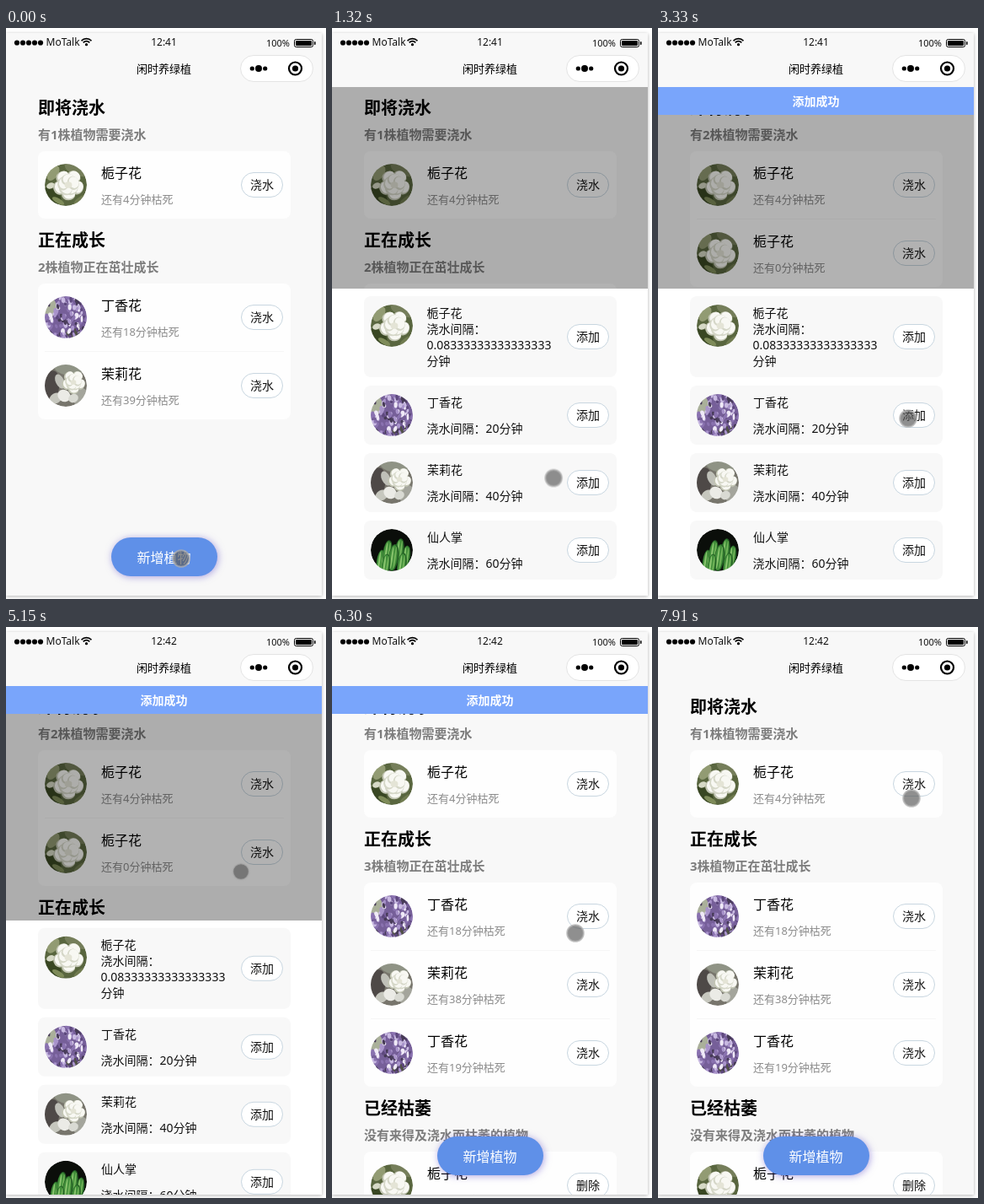
Recreate the animation shown at these times as an HTML page. Size 380 by 677 pixels, loop 7990 ms.

```html
<!DOCTYPE html>
<html lang="zh-CN">
<head>
<meta charset="utf-8">
<title>浇水提醒</title>
<style>
  html, body { margin: 0; width: 100%; height: 100%; overflow: hidden; background: #fff; }
  #stage { display: block; width: 380px; height: 677px; }
  text { font-family: "Noto Sans", "Noto Sans CJK SC", "Noto Sans CJK", sans-serif; }
  .phone { fill: #f8f8f8; filter: drop-shadow(0 1px 2px rgba(0, 0, 0, .3)); }
  .fab { fill: #5f90e8; filter: drop-shadow(1px 1px 4px rgba(95, 75, 200, .5)); }
  .pill { fill: #fff; stroke: #c8d6e0; }
  .soft { filter: blur(.7px); }
</style>
</head>
<body>
<svg id="stage" viewBox="0 0 380 677"></svg>
<script>
const LOOP = 7990;
const css = [];

// Registers a looping animation on #id from a map of { ms: declarations }.
function animate(id, timing, frames) {
  const steps = Object.entries(frames).map(([ms, rule]) => `${(ms / LOOP * 100).toFixed(3)}% { ${rule} }`);
  css.push(`@keyframes ${id} { ${steps.join(' ')} }`, `#${id} { animation: ${id} ${LOOP}ms ${timing} infinite; }`);
}
const show = (id, from, to) => animate(id, 'step-end', {
  0: 'visibility: hidden', [from]: 'visibility: visible', [to]: 'visibility: hidden'
});

const text = (x, y, size, str, { fill = '#111', weight = 400, anchor = 'start' } = {}) =>
  `<text x="${x}" y="${y}" font-size="${size}" fill="${fill}" font-weight="${weight}" text-anchor="${anchor}">${str}</text>`;
const rect = (x, y, w, h, r, fill) => `<rect x="${x}" y="${y}" width="${w}" height="${h}" rx="${r}" fill="${fill}"/>`;
const dot = (x, y, r, fill = '#000') => `<circle cx="${x}" cy="${y}" r="${r}" fill="${fill}"/>`;
const oval = (x, y, rx, ry, fill, turn = 0) =>
  `<ellipse rx="${rx}" ry="${ry}" fill="${fill}" transform="translate(${x} ${y}) rotate(${turn})"/>`;
const repeat = (n, draw) => Array.from({ length: n }, (_, i) => draw(i)).join('');

function randomizer(seed) {
  return () => (seed = (seed * 16807) % 2147483647) / 2147483647;
}

// Three rings of petals, each on its own shadow.
function rose(x, y, size) {
  const ring = (r, turn, shade) => repeat(5, i => {
    const a = i * Math.PI * .4 + turn;
    const px = x + Math.cos(a) * r, py = y + Math.sin(a) * r, deg = a * 180 / Math.PI;
    return oval(px, py, size * .4, size * .48, shade, deg) + oval(px + .8, py - .8, size * .34, size * .41, '#f8f8f3', deg);
  });
  return ring(size * .68, .3, '#c3c6b4') + ring(size * .36, .9, '#d5d7c8') + oval(x, y, size * .26, size * .22, '#e4e4d6');
}

function lilac() {
  const rnd = randomizer(77);
  const tones = ['#5d487d', '#8a72b0', '#c9bae2', '#efe9f7', '#463a56', '#a994cb'];
  return dot(0, 0, 25, '#765f99') + oval(-20, -12, 9, 12, '#aab09a') + oval(14, 20, 14, 7, '#4f5044') +
    repeat(130, i => oval(rnd() * 50 - 25, rnd() * 50 - 25, 1.3 + rnd() * 1.2, 1.8 + rnd() * 2.2, tones[i % 6], rnd() * 60 - 30));
}

function cactus() {
  const stems = [[-13, 13, 5], [17, 8, 5], [-5, 3, 5.5], [9, 1, 5.5], [2, 9, 6], [-7, 18, 5], [12, 18, 5.5]];
  return dot(0, 0, 25, '#0b0e0a') + stems.map(([x, y, w]) =>
    oval(x, y, w, w * 2.7, '#245f25', 8) + oval(x - .5, y, w * .8, w * 2.5, '#43903b', 8) +
    oval(x - 1.8, y, 1, w * 2.2, '#8cc670', 8) + oval(x + 1.8, y, .9, w * 2.2, '#75b55c', 8)).join('');
}

const photos = {
  gardenia: dot(0, 0, 25, '#59663f') + oval(14, -19, 16, 8, '#757e5a', 20) + oval(-17, 13, 13, 8, '#394723', 35) +
    oval(-15, -14, 6, 10, '#929b73', 35) + oval(18, 19, 10, 5, '#707b50', -35) + oval(-9, 19, 8, 3, '#7e8b59', 30) +
    oval(-18, 1, 5, 3.5, '#d6d9c6', -20) + rose(3, 0, 17),
  lilac: lilac(),
  jasmine: dot(0, 0, 25, '#77756c') + oval(-18, 2, 10, 20, '#4e4947', 12) + oval(3, -20, 17, 8, '#8f9385', 10) +
    oval(18, 14, 10, 12, '#a4a59c', -15) + oval(-12, 15, 8, 6, '#c6c7be', -30) + oval(-7, -5, 5, 9, '#bfc0b8', -25) +
    rose(9, -4, 13) + oval(-2, 12, 8, 7, '#ebebe6', 35) + oval(9, 15, 6, 5, '#d9dad3', -25),
  cactus: cactus()
};
const plants = { gardenia: '栀子花', lilac: '丁香花', jasmine: '茉莉花', cactus: '仙人掌' };
const photo = (kind, y) => `<use href="#${kind}" x="71" y="${y}"/>`;

const pill = (y, label) => `<rect class="pill" x="279.5" y="${y - 14.5}" width="49" height="29" rx="14.5"/>` +
  text(304, y + 5, 14, label, { anchor: 'middle' });

function section(top, title, note, items, action = '浇水') {
  const rows = items.map(([kind, minutes], i) => {
    const y = top + 92 + i * 81;
    return (i ? rect(46, y - 41, 284, 1, 0, '#f6f6f6') : '') + photo(kind, y) +
      text(113, y - 8, 16, plants[kind], { fill: '#000' }) +
      text(113, y + 21.5, 13, `还有${minutes}分钟枯死`, { fill: '#8c8c8c' }) + pill(y, action);
  });
  return text(38, top + 7.5, 20, title, { fill: '#000', weight: 700 }) +
    text(38, top + 38, 15, note, { fill: '#7d7d7d', weight: 700 }) +
    rect(38, top + 52, 300, items.length * 81 - 1, 8, '#fefefe') + rows.join('');
}

function page(id, thirsty, growing, dead = []) {
  const second = 94 + 76 + thirsty.length * 81;
  const third = second + 76 + growing.length * 81;
  return `<g id="${id}">` +
    section(94, '即将浇水', `有${thirsty.length}株植物需要浇水`, thirsty) +
    section(second, '正在成长', `${growing.length}株植物正在茁壮成长`, growing) +
    (dead.length ? section(third, '已经枯萎', '没有来得及浇水而枯萎的植物', dead, '删除') : '') + '</g>';
}

function option(kind, y, minutes) {
  return rect(38, y, 300, 70, 8, '#f8f8f8') + photo(kind, y + 35) + text(113, y + 25, 14, plants[kind]) +
    text(112.5, y + 56, 14, `浇水间隔：${minutes}分钟`) + pill(y + 35, '添加');
}

const sheet = rect(0, 309, 375, 364, 0, '#fff') + rect(38, 318, 300, 96, 8, '#f8f8f8') + photo('gardenia', 353) +
  ['栀子花', '浇水间隔：', '0.08333333333333333', '分钟'].map((s, i) => text(112.5, 343 + i * 19, 14, s)).join('') +
  pill(366, '添加') + option('lilac', 424, 20) + option('jasmine', 504, 40) + option('cactus', 584, 60);

const arc = r => `<path d="M${95.5 - r * .75} ${21 - r * .72}A${r} ${r} 0 0 1 ${95.5 + r * .75} ${21 - r * .72}" fill="none" stroke="#000" stroke-width="1.7"/>`;
const clock = (id, time) => `<g id="${id}">${text(187.5, 21, 12, time, { anchor: 'middle' })}</g>`;
const statusBar = repeat(5, i => dot(13 + i * 7, 17.5, 3.1)) + text(47.5, 21, 12, 'MoTalk') +
  arc(8) + arc(5) + dot(95.5, 19.7, 1.6) + clock('before', '12:41') + clock('after', '12:42') +
  text(337, 21.5, 11, '100%', { anchor: 'end' }) +
  '<rect x="342.5" y="13.5" width="22" height="9" rx="2" fill="none" stroke="#000"/>' +
  rect(344, 15, 19, 6, 1, '#000') + rect(366, 16, 1.6, 4, .8, '#000');
const navBar = text(187.5, 53, 13, '闲时养绿植', { fill: '#000', anchor: 'middle' }) +
  '<rect x="278.5" y="32.5" width="86" height="31" rx="15.5" fill="#fff" stroke="#e4e4e4"/>' +
  dot(292.3, 48, 2.6) + dot(300, 48, 4) + dot(307.7, 48, 2.6) +
  '<circle cx="343.5" cy="48" r="7.5" fill="none" stroke="#000" stroke-width="2.2"/>' + dot(343.5, 48, 3.6);

const soon = ['gardenia', 4], fresh = ['gardenia', 0];
const grown = [['lilac', 18], ['jasmine', 38], ['lilac', 19]];

document.getElementById('stage').innerHTML = `
  <defs>
    <clipPath id="round"><circle r="25"/></clipPath>
    ${Object.entries(photos).map(([id, art]) => `<g id="${id}" clip-path="url(#round)"><g class="soft">${art}</g></g>`).join('')}
  </defs>
  <rect class="phone" x="0" y="6" width="375" height="667"/>
  <svg x="0" y="70" width="375" height="603" viewBox="0 70 375 603">
    ${page('start', [soon], [['lilac', 18], ['jasmine', 39]])}
    ${page('added', [soon, fresh], [['lilac', 18], ['jasmine', 39]])}
    ${page('grown', [soon, fresh], grown)}
    ${page('withered', [soon], grown, [fresh])}
    <rect class="fab" x="125" y="604" width="126" height="46" rx="23"/>
    ${text(187.5, 634, 16, '新增植物', { fill: '#fff', weight: 500, anchor: 'middle' })}
    <g id="shade">${rect(0, 70, 375, 603, 0, 'rgba(0,0,0,.3)')}</g>
    <g id="sheet">${sheet}</g>
    <g id="toast">${rect(0, 70, 375, 33, 0, '#79a5fb')}
      ${text(187.5, 92, 14, '添加成功', { fill: '#fff', weight: 700, anchor: 'middle' })}</g>
  </svg>
  ${statusBar}${navBar}
  <g id="cursor"><circle r="9.8" fill="rgba(90,90,90,.68)" stroke="rgba(175,175,175,.75)" stroke-width="2"/></g>`;

show('start', 0, 2515);
show('added', 2515, 3985);
show('grown', 3985, 6300);
show('withered', 6300, LOOP);
show('before', 0, 4200);
show('after', 4200, LOOP);

// Holds `off`, eases to `on` at `open`, and back at `close`.
const toggle = (id, off, on, [open, opened], [close, closed]) => animate(id, 'ease', {
  0: off, [open]: off, [opened]: on, [close]: on, [closed]: off, [LOOP]: off
});
toggle('shade', 'opacity: 0', 'opacity: 1', [900, 1200], [5150, 5285]);
toggle('sheet', 'transform: translateY(364px)', 'transform: translateY(0)', [900, 1200], [5131, 5317]);
toggle('toast', 'opacity: 0; transform: translateY(-33px)', 'opacity: 1; transform: translateY(0)', [2515, 2815], [6990, 7290]);

const path = [
  [0, 208, 629], [80, 208, 629], [710, 232, 597], [860, 232, 597], [1320, 263, 534], [1640, 306, 389],
  [1950, 304, 368], [2400, 304, 368], [3100, 296, 463], [3330, 297, 463], [3850, 297, 463], [4510, 279, 290],
  [5150, 279, 290], [5290, 279, 297], [5600, 277, 366], [5830, 277, 366], [6130, 289, 363], [6300, 289, 363],
  [6610, 275, 352], [6840, 275, 352], [7070, 267, 344], [7600, 281, 225], [7680, 281, 225], [7840, 302, 198],
  [7910, 301, 203], [LOOP, 301, 203]
];
animate('cursor', 'linear', Object.fromEntries(path.map(([ms, x, y]) => [ms, `transform: translate(${x}px, ${y}px)`])));

const style = document.createElement('style');
style.textContent = css.join('\n');
document.head.append(style);
</script>
</body>
</html>
```
